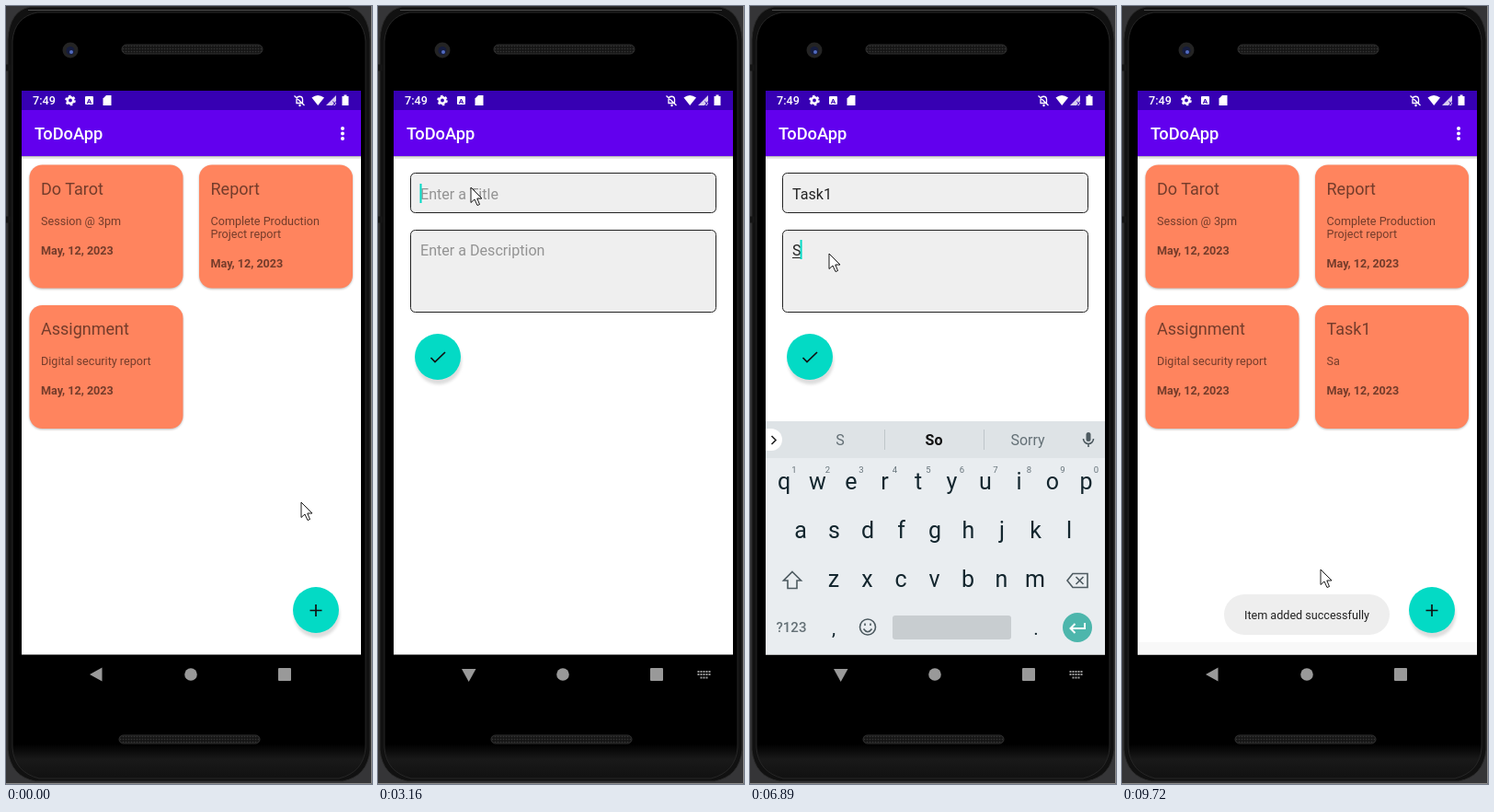
An HTML page for the animation above (9.74 s loop, 398 px wide and 845 px high).

```html
<!DOCTYPE html>
<html lang="en">
<head>
<meta charset="utf-8">
<title>ToDoApp</title>
<style>
  html, body { margin: 0; width: 100%; height: 100%; overflow: hidden; background: #353537; }
  svg { display: block; width: 398px; height: 845px; font-family: Roboto, sans-serif; }
  text { white-space: pre; }
  .bar { font-size: 18.3px; font-weight: 500; fill: #fff; }
  .card rect { fill: #ff845e; filter: drop-shadow(0 1px 1px #0004); }
  .card text { fill: #743c2b; font-size: 12.6px; }
  .card .head { font-size: 18px; }
  .card .date { font-weight: 700; }
  .fab { fill: #03dac5; filter: drop-shadow(1px 5px 1.5px #0002); }
  .fab.down { fill: #00d2bd; filter: drop-shadow(1px 4px 3px #0003); }
  .mark { fill: none; stroke: #111; stroke-width: 1.7; }
  .field { fill: #efefef; stroke: #222; }
  .input { font-size: 16.1px; fill: #222; }
  .hint { fill: #939393; }
  .key { font-size: 25px; fill: #13262e; }
  .num { font-size: 9.5px; fill: #66737a; }
  .word { font-size: 16px; fill: #647076; }
  #keyboard text, .mid { text-anchor: middle; }
  .icon { fill: none; stroke: #4d5a60; stroke-width: 1.6; }
</style>
</head>
<body>
<svg viewBox="0 0 398 845">
  <defs>
    <clipPath id="display"><rect x="17" y="92" width="369" height="656"/></clipPath>
    <clipPath id="reveal"><rect id="revealBox" x="17" y="92" width="369" height="656"/></clipPath>
    <linearGradient id="chin" x2="0" y2="1">
      <stop offset=".955" stop-color="#000"/><stop offset=".975" stop-color="#191919"/><stop offset="1" stop-color="#111"/>
    </linearGradient>
    <pattern id="mesh" width="3" height="3" patternUnits="userSpaceOnUse">
      <rect width="3" height="3" fill="#161616"/><circle cx="1.5" cy="1.5" r=".8" fill="#343434"/>
    </pattern>
  </defs>

  <!-- phone -->
  <rect width="398" height="845" fill="#353537"/>
  <path d="M0 844.500H397.500V0" fill="none" stroke="#8c8c8c"/>
  <path d="M2 36Q4 5 26 1H372Q394 5 396 36V808Q393 837 366 842H32Q5 837 2 808Z" fill="#111" stroke="#2c2c2c"/>
  <path d="M7 38Q9 12 34 7H364Q389 12 391 38V806Q389 832 362 839H36Q9 832 7 806Z" fill="url(#chin)" stroke="#262626"/>
  <path d="M24 4.500H374" stroke="#4c4c4c"/>
  <path d="M0 67H5M0 232H5" stroke="#151515" stroke-width="7"/>
  <rect x="126" y="42" width="153" height="10" rx="5" fill="url(#mesh)" stroke="#303030"/>
  <rect x="123" y="792" width="153" height="9" rx="4.500" fill="url(#mesh)" stroke="#303030"/>
  <circle cx="70" cy="48" r="8.500" fill="#242424"/>
  <circle cx="70" cy="48.500" r="4.500" fill="#151c3d"/>
  <circle cx="71" cy="50" r="2" fill="#526bc0"/>

  <g clip-path="url(#display)">
    <g id="list">
      <use href="#window"/>
      <text class="bar" x="31" y="145">ToDoApp</text>
      <g fill="#fff"><circle cx="366" cy="133" r="2"/><circle cx="366" cy="138.500" r="2"/><circle cx="366" cy="144" r="2"/></g>
      <rect id="band" x="17" y="691" width="369" height="13.500" fill="#f8f8f8"/>
      <g id="cards"></g>
      <circle id="add" class="fab" cx="337" cy="656" r="25"/>
      <path class="mark" d="M330.500 656.500H343.500M337 650V663"/>
    </g>
    <rect id="scrim" x="17" y="92" width="369" height="656"/>
    <g clip-path="url(#reveal)">
      <g id="form">
        <g id="window">
          <rect x="17" y="92" width="369" height="656"/>
          <rect x="17" y="163" width="369" height="541.500" fill="#fff"/>
          <rect x="17" y="163" width="369" height="1.500" fill="#bbb"/>
          <rect x="17" y="164.500" width="369" height="1.500" fill="#e8e8e8"/>
          <rect x="17" y="92" width="369" height="21" fill="#3700b3"/>
          <rect x="17" y="113" width="369" height="50" fill="#6200ee"/>
        </g>
        <text class="bar" x="31" y="145">ToDoApp</text>
        <rect class="field" x="35.500" y="181.500" width="332" height="43" rx="5"/>
        <rect class="field" x="35.500" y="243.500" width="332" height="89" rx="5"/>
        <text id="title" class="input" x="46" y="210"></text>
        <text id="desc" class="input" x="46" y="271"></text>
        <rect id="underline" x="46" height="1" fill="#222"/>
        <rect id="caret" width="2" height="21" fill="#03dac5"/>
        <circle id="save" class="fab" cx="65" cy="381" r="25"/>
        <path class="mark" d="M57.500 382L62 386.500L73 376"/>
      </g>
    </g>

    <g id="toast">
      <rect x="111" y="639" width="180" height="44" rx="22" fill="#eee"/>
      <text class="mid" x="201" y="666" font-size="12.600" fill="#222">Item added successfully</text>
    </g>

    <g id="keyboard">
      <rect x="17" y="451" width="369" height="253.500" fill="#e9edf0"/>
      <rect x="17" y="451" width="369" height="40" fill="#dee3e6"/>
      <path d="M146.500 460V482M254.500 460V482" stroke="#bfc6ca"/>
      <path d="M17 459H23A12 12 0 0 1 23 483H17Z" fill="#fff"/>
      <path class="icon" d="M23.500 467L28 471.500L23.500 476" style="stroke:#222"/>
      <rect x="365.500" y="463" width="5" height="10" rx="2.500" fill="#4d5a60"/>
      <path class="icon" d="M362.500 470A5.500 5.500 0 0 0 373.500 470M368 475.500V479"/>
      <path class="icon" d="M46 614.500L55.500 624H51V632.500H41V624H36.500Z"/>
      <path class="icon" d="M351 616.500H367V631.500H351L345 624ZM354.500 620L362.500 628M362.500 620L354.500 628"/>
      <text class="word" x="45" y="680" font-weight="500" style="font-size:15px">?123</text>
      <text class="key" x="91" y="683" style="font-size:21px">,</text>
      <text class="key" x="311" y="683" style="font-size:21px">.</text>
      <circle class="icon" cx="128" cy="674.500" r="8.500"/>
      <path class="icon" d="M123.500 676.500Q128 683 132.500 676.500M125 670.500V673M131 670.500V673"/>
      <rect x="155" y="662" width="129" height="26" rx="3" fill="#c8cdd0"/>
      <circle cx="356" cy="675" r="16" fill="#4db6ac"/>
      <path d="M364 670V676H349M353.500 671L348.500 676L353.500 681" fill="none" stroke="#fff" stroke-width="2"/>
    </g>

    <!-- status bar -->
    <g fill="#fff">
      <text x="29" y="107" font-size="12.600" font-weight="500">7:49</text>
      <circle cx="70" cy="102.500" r="3.200" fill="none" stroke="#fff" stroke-width="2.600"/>
      <circle cx="70" cy="102.500" r="5" fill="none" stroke="#fff" stroke-width="1.600" stroke-dasharray="2.600 2.636"/>
      <rect x="86" y="98" width="9" height="9" rx="1"/>
      <text class="mid" x="90.500" y="105.500" font-size="8" font-weight="700" style="fill:#3700b3">A</text>
      <path d="M109 97H114.500V108H105.500V100.500Z"/>
      <path d="M316 105.500V101A3.300 3.300 0 0 1 322.500 101V105.500ZM313.500 97.500L324.500 108" fill="none" stroke="#fff" stroke-width="1.300"/>
      <circle cx="319.500" cy="108" r="1.200"/>
      <path d="M332.500 99.500Q339 94.500 346 99.500L339.200 108Z"/>
      <path d="M359 97V108H348Z" opacity=".8"/>
      <path d="M355.500 103.500L359 108M359 103.500L355.500 108" stroke="#3700b3"/>
      <path d="M365.500 98H367.500V96.500H370.500V98H372.500V108H365.500Z"/>
    </g>
    <!-- navigation bar -->
    <g fill="#fff" opacity=".6">
      <path id="back"/>
      <circle cx="201" cy="726" r="6.800"/>
      <rect x="296" y="719" width="14" height="14" rx="1"/>
      <path id="switcher" d="M347.500 723H361.500M347.500 726H361.500M350.500 729.500H358.500" stroke="#fff" stroke-width="2" stroke-dasharray="2 1"/>
    </g>
  </g>
  <path id="pointer" d="M0 0V16.500L4 13L7 19.500L9.500 18.500L6.800 12H12Z" fill="#fff" stroke="#000" stroke-width=".9"/>
</svg>

<script>
const LOOP = 9740;
const $ = id => document.getElementById(id);
const set = (id, attrs) => { for (const k in attrs) $(id).setAttribute(k, attrs[k]); };
const show = (id, on) => set(id, { visibility: on ? 'visible' : 'hidden' });
const clamp = v => Math.max(0, Math.min(1, v));
const within = (t, a, b) => t >= a && t < b;

// Screen refreshes as [first, last, count]
const refreshes = [
  [280, 850, 5], [1630, 1870, 3], [1870, 2020, 2], [2020, 2530, 5],
  [2680, 3160, 5], [3160, 3310, 2], [3310, 3580, 3], [3980, 4400, 4],
  [4840, 4840, 1], [5240, 5930, 6], [6360, 6360, 1], [6890, 6890, 1],
  [7170, 7170, 1], [7600, 8480, 6], [8480, 8630, 2], [8630, 8750, 2], [9030, 9720, 6]
];
function snap(t) {
  let held = 0;
  for (const [a, b, n] of refreshes) {
    if (t < a) break;
    const step = (b - a) / (n - 1);
    held = t >= b ? b : a + Math.floor((t - a) / step + 1e-6) * step;
  }
  return held;
}

// Pointer way points: time, x, y
const route = [
  [0, 321, 539], [140, 321, 539], [850, 337, 657], [2540, 337, 657], [3040, 101, 197],
  [5240, 101, 197], [5792, 86, 269], [7430, 86, 269], [7952, 75, 384], [8630, 75, 384],
  [8750, 134, 354], [8900, 134, 354], [9168, 215, 430], [9306, 281, 540],
  [9444, 262, 665], [9720, 216, 612]
];
function pointerAt(t) {
  const i = route.findIndex(p => p[0] > t);
  if (i < 0) return route[route.length - 1].slice(1);
  const [a, x, y] = route[i - 1], [b, u, v] = route[i];
  const k = (t - a) / (b - a), e = k * k * (3 - 2 * k);
  return [x + (u - x) * e, y + (v - y) * e];
}

const suggestions = {
  '': ['I', 'The', "I'm"], T: ['The', 'This', 'Thanks'], Ta: ['Ta', 'Take', 'Talk'],
  Tas: ['Tas', 'Task', 'Tasks'], Task: ['Task', 'Tasks', 'Talk'], Task1: ['Task1', 'Task', 'Tasks'],
  S: ['S', 'So', 'Sorry'], Sa: ['Sa', 'Sad', 'Say']
};

function addCard(id, x, y, head, lines) {
  const label = (cls, dy, s) => `<text class="${cls}" x="${x + 12.500}" y="${y + dy}">${s}</text>`;
  $('cards').innerHTML += `<g class="card" id="${id}"><rect x="${x}" y="${y}" width="167" height="134" rx="14"/>` +
    label('head', 32, head) + lines.map((s, i) => label('', 65 + i * 14.500, s)).join('') +
    label('date', 82.500 + lines.length * 14.500, 'May, 12, 2023') + '</g>';
}
addCard('tarot', 25.500, 172.500, 'Do Tarot', ['Session @ 3pm']);
addCard('report', 210, 172.500, 'Report', ['Complete Production', 'Project report']);
addCard('assignment', 25.500, 325, 'Assignment', ['Digital security report']);
addCard('task', 210, 325, 'Task1', ['Sa']);

let keys = '';
[['qwertyuiop', 37], ['asdfghjkl', 55], ['zxcvbnm', 91]].forEach(([row, x0], r) =>
  [...row].forEach((c, i) => {
    const x = x0 + i * 36.500;
    keys += `<text class="key" x="${x}" y="${525.300 + r * 52.600}">${c}</text>`;
    if (!r) keys += `<text class="num" x="${x + 11}" y="507">${(i + 1) % 10}</text>`;
  }));
[98, 200, 302].forEach((x, i) => keys += `<text class="word" id="word${i}" x="${x}" y="477"></text>`);
$('keyboard').innerHTML += keys;

function fill(id, text, hint) {
  $(id).textContent = text || hint;
  $(id).classList.toggle('hint', !text);
}

function draw(t) {
  const [x, y] = pointerAt(t);
  set('pointer', { transform: `translate(${x} ${y})` });

  // Screen change: 0 shows the list, 1 the form
  const easeOut = v => 1 - (1 - clamp(v)) ** 2;
  const open = t < 5000 ? easeOut((t - 1950) / 480) : 1 - easeOut((t - 8250) / 440);
  const hidden = 656 * Math.min(1, 1.217 * (1 - open));
  set('list', { transform: `translate(0 ${-13 * open})` });
  set('form', { transform: `translate(0 ${26 * (1 - open)})` });
  set('revealBox', { y: 92 + hidden, height: 656 - hidden });
  set('scrim', { opacity: 0.3 * open });
  show('task', t > 7000);
  show('band', t >= 8630);
  $('add').classList.toggle('down', within(t, 1750, 2400));
  $('save').classList.toggle('down', within(t, 8100, 8400));

  // Typing
  const typed = t >= 5240 ? 5 : Math.max(0, Math.min(4, Math.floor((t - 3980) / 140 + 1.001)));
  const title = 'Task1'.slice(0, typed);
  const desc = t >= 7170 ? 'Sa' : t >= 6890 ? 'S' : '';
  fill('title', title, 'Enter a Title');
  fill('desc', desc, 'Enter a Description');
  const inDesc = t >= 5929, text = inDesc ? desc : title;
  const width = text ? $(inDesc ? 'desc' : 'title').getComputedTextLength() : 0;
  const top = inDesc ? 254 : 193;
  set('underline', { y: top + 19, width });
  set('caret', { x: 45.500 + width - (text ? 0.5 : 0), y: top });
  const blinkOff = within(t, 4840, 5240) || within(t, 6360, 6890) || t >= 7770;
  show('caret', t >= 3040 && !blinkOff);

  // Keyboard
  suggestions[text].forEach((word, i) => $('word' + i).textContent = word);
  const sure = ['Tas', 'S', 'Sa'].includes(text);
  $('word1').style.cssText = sure ? 'font-weight:700;fill:#111' : '';
  const up = Math.min(clamp((t - 3250) / 300), clamp((8514 - t) / 280));
  set('keyboard', { opacity: up, transform: `translate(0 ${52 * (1 - up)})` });
  const typing = within(t, 3159, 8400);
  set('back', { d: typing ? 'M91 720H106.500L98.700 734Z' : 'M91 726L104.500 718.500V733.500Z' });
  show('switcher', typing);

  set('toast', { opacity: clamp((t - 8304) / 220) });
}

function tick() {
  draw(snap(performance.now() % LOOP));
  requestAnimationFrame(tick);
}
tick();
</script>
</body>
</html>
```
